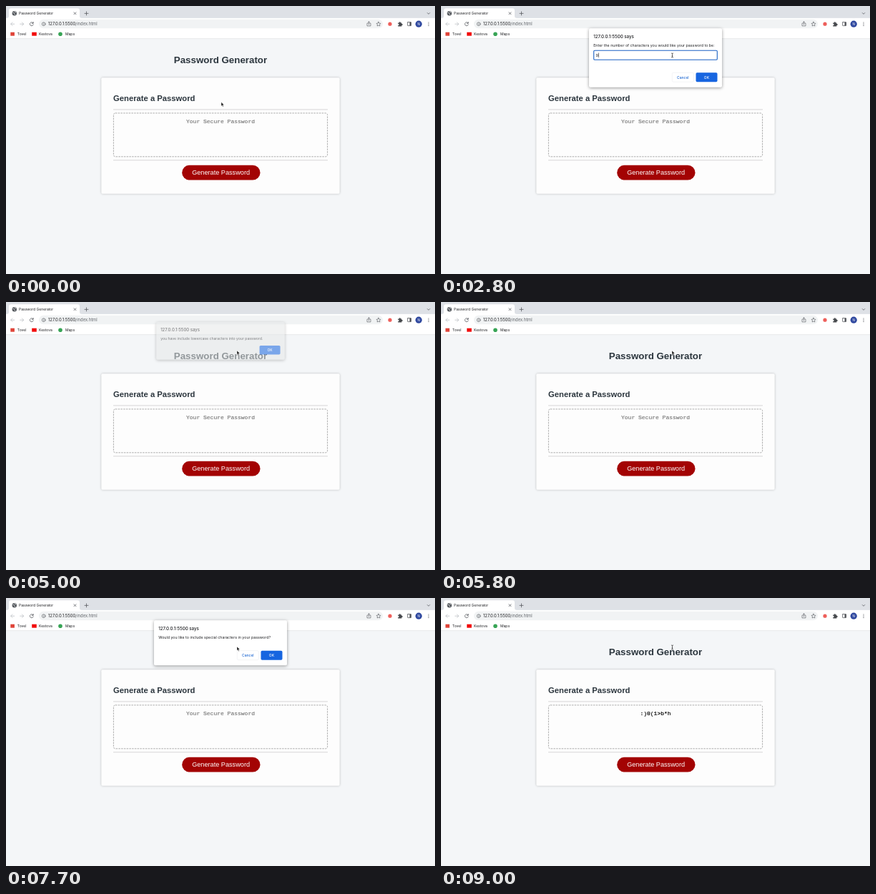
These frames come from a looping animation (600x375 px, 10 s). An HTML page:

```html
<!DOCTYPE html>
<html lang="en">
<head>
<meta charset="utf-8">
<title>Password Generator</title>
<style>
  html, body { margin: 0; width: 100%; height: 100%; overflow: hidden; background: #f4f6f8; }
  svg { display: block; width: 600px; height: 375px; }
  text { white-space: pre; }
  .ui { font-family: Inter, Roboto, sans-serif; fill: #202124; }
  .page { font-family: "Liberation Sans", Arial, sans-serif; fill: #2c363e; font-weight: 700; }
  .mono { font: 8px "Liberation Mono", "Courier New", monospace; text-anchor: middle; }
  .mid { text-anchor: middle; }
  .line { fill: none; stroke: #505358; stroke-width: .75; stroke-linecap: round; stroke-linejoin: round; }
  .card { filter: drop-shadow(0 .9px 1.7px rgba(0, 0, 0, .25)); }
  .sheet { filter: drop-shadow(0 1px 2px rgba(0, 0, 0, .4)); }
</style>
</head>
<body>
<svg viewBox="0 0 600 375">
  <rect width="600" height="375" fill="#f4f6f8"/>

  <!-- Browser frame -->
  <rect width="600" height="17" fill="#dee1e6"/>
  <path d="M1 17Q4 17 4 14V6.500Q4 3.300 7 3.300H100Q103 3.300 103 6.500V14Q103 17 106 17Z" fill="#fff"/>
  <rect y="16.900" width="600" height="29" fill="#fff"/>
  <rect y="45.500" width="600" height=".6" fill="#d9dce0"/>
  <circle cx="11.800" cy="10.300" r="3.200" fill="#55595e"/>
  <path d="M9.600 9.300Q11 9 11.500 10.400T13 12M11.600 7.700Q13 8.400 14.200 8.600" fill="none" stroke="#fff" stroke-width=".8"/>
  <text class="ui" x="18" y="12.200" font-size="5">Password Generator</text>
  <path class="line" d="M95 8.800l3 3M98 8.800l-3 3M110 10.400h5M112.500 7.900v5M589.300 9.600l1.700 1.700 1.700-1.700"/>

  <g class="line">
    <path d="M11.700 25.200H6.800M9 22.900L6.700 25.200 9 27.500M19.700 25.200h4.900M22.400 22.900l2.300 2.300-2.300 2.300" stroke="#b9bcc0"/>
    <path d="M37.700 23.500A2.500 2.500 0 1 0 38.300 25.900M38.200 22.400V24.300H36.300"/>
  </g>
  <rect x="46" y="18.800" width="481" height="12.500" rx="6.250" fill="#f1f3f4"/>
  <g class="line">
    <circle cx="52.700" cy="25.200" r="2.400" stroke-width=".6"/>
    <path d="M52.700 25v1.400M52.700 23.800v.1" stroke-width=".6"/>
    <path d="M506.200 24.200h-1.200v3.700h5v-3.700h-1.200M507.500 26V21.900M506.200 23.100l1.300-1.300 1.300 1.300" stroke-width=".6"/>
    <path d="M521 22.200l.9 1.900 2.100.3-1.500 1.500.4 2.100-1.900-1-1.900 1 .4-2.100-1.500-1.500 2.100-.3Z" stroke-width=".6"/>
    <rect x="561.600" y="22.600" width="5" height="5" rx=".5"/>
  </g>
  <text class="ui" x="59" y="27.300" font-size="5.830">127.0.0.1:5500<tspan fill="#62666b">/index.html</tspan></text>
  <circle cx="537" cy="25.200" r="2.600" fill="#ee5f5b"/>
  <path d="M548.300 23.600h1.600a1 1 0 1 1 1.900 0h1.600v1.500a1 1 0 1 1 0 1.900v1.400h-5.100v-1.400a1 1 0 1 0 0-1.900Z" fill="#46494d"/>
  <rect x="564.500" y="22.600" width="2.100" height="5" fill="#505358"/>
  <circle cx="577.200" cy="25.200" r="4.600" fill="#2f489f"/>
  <text class="ui mid" x="577.200" y="26.900" font-size="4.600" style="fill:#fff">N</text>
  <g fill="#505358"><circle cx="591" cy="23" r=".6"/><circle cx="591" cy="25.200" r=".6"/><circle cx="591" cy="27.400" r=".6"/></g>

  <rect x="6.300" y="36.700" width="5.600" height="5" fill="#df4338"/>
  <rect x="36.200" y="36.700" width="6.600" height="5" fill="#f20d0d"/>
  <circle cx="76" cy="39.200" r="2.800" fill="#37a455"/>
  <g class="ui" font-size="5">
    <text x="15.800" y="41">Tovel</text>
    <text x="46" y="41">Kestova</text>
    <text x="83" y="41">Maps</text>
  </g>

  <!-- Page -->
  <text class="page mid" x="300" y="80" font-size="13.330">Password Generator</text>
  <rect class="card" x="133.300" y="100.300" width="333.400" height="162.400" rx="2" fill="#fdfdfd"/>
  <text class="page" x="150" y="132.700" font-size="11.250">Generate a Password</text>
  <path d="M150 144.900H450M150 215.800H450" stroke="#d0cecf" stroke-width=".85"/>
  <rect x="150.400" y="149.900" width="299.200" height="60.900" rx="2.500" fill="none" stroke="#9c9c9c" stroke-width=".83" stroke-dasharray="2.500 1.250"/>
  <text class="mono" id="field" x="300" y="163.800"></text>
  <rect x="246.200" y="222.700" width="109.300" height="20.900" rx="10.450" fill="#a30303"/>
  <text class="page mid" x="300.600" y="236.400" font-size="9.170" style="fill:#fff;font-weight:400">Generate Password</text>

  <g id="dialog"></g>
  <g id="cursor"></g>
</svg>
<script>
const LOOP = 10000, STEP = 100;
const $ = id => document.getElementById(id);

const ask = what => `Would you like to include ${what} in your password?`;
const told = what => `you have include ${what} characters into your password.`;

// [kind, fully open at, starts closing at, message, height]
const dialogs = [
  ["prompt", 1400, 3000, "Enter the number of characters you would like your password to be:", 82.500],
  ["alert", 3300, 3600, "your password will have 9 characters.", 54.500],
  ["confirm", 4000, 4300, ask("lower case letters"), 63],
  ["alert", 4600, 5000, told("lowercase"), 54.500],
  ["confirm", 5300, 5700, ask("upper case letters"), 63],
  ["alert", 6000, 6400, told("uppercase"), 54.500],
  ["confirm", 6700, 7000, ask("numbers"), 54.500],
  ["alert", 7300, 7600, told("number"), 54.500],
  ["confirm", 7700, 8100, ask("special characters"), 63],
  ["alert", 8400, 8800, told("special"), 54.500]
];

// Pointer waypoints: time, x, y
const path = [[0, 301, 134.500], [600, 300, 196], [900, 302, 249], [1100, 305, 232],
              [1300, 305, 232], [2100, 323, 68]];

const shapes = {
  arrow: '<path d="M0 0V5.600L1.300 4.400 2.200 6.500 3.200 6.100 2.300 4.100H4Z" fill="#111" stroke="#fff" stroke-width=".45"/>',
  beam: '<path d="M-1 -2Q.5 -2 .5 -1.200Q.5 -2 2 -2M.5 -1.200V3.200M-1 4Q.5 4 .5 3.200Q.5 4 2 4M-.3 1.800H1.300" fill="none" stroke="#222" stroke-width=".65"/>',
  hand: '<path d="M-.6 0Q0 -.7 .6 0V2.700L3.300 3.300Q4 3.500 3.800 4.500L3.200 6.800H.2L-2 4.200Q-1.700 3.400 -.6 4.100Z" fill="#fff" stroke="#111" stroke-width=".5"/>'
};

function button(x, y, label, fill, ink, edge) {
  return `<rect x="${x}" y="${y - 6.500}" width="30" height="13" rx="1.700" fill="${fill}" stroke="${edge}" stroke-width=".5"/>
    <text class="ui mid" x="${x + 15}" y="${y + 1.800}" font-size="5" font-weight="500" style="fill:${ink}">${label}</text>`;
}

function inputBox(t) {
  const typed = t >= 2800;
  const caret = typed || t < 1900 || t >= 2400;
  return `<rect x="213.700" y="62.300" width="172.600" height="13" rx="1.300" fill="#fff" stroke="#1c62c4" stroke-width="1.100"/>
    ${typed ? '<text class="ui" x="216.600" y="70.700" font-size="5.400">9</text>' : ""}
    ${caret ? `<rect x="${typed ? 220.200 : 216.700}" y="65.500" width=".6" height="6.500" fill="#202124"/>` : ""}`;
}

function drawDialog(t) {
  const active = dialogs.find(([, open, close]) => t >= open - STEP && t <= close);
  if (!active) return "";
  const [kind, open, close, message, height] = active;
  const fading = t < open || t >= close;
  const y = 31 + height - 13.800;
  const look = fading ? 'opacity=".55" transform="matrix(.966 0 0 .966 10.200 -2.070)"' : "";
  return `<g ${look}>
    <rect class="sheet" x="207" y="31.200" width="186" height="${height}" rx="2" fill="${fading ? "#e6e8e8" : "#fff"}"/>
    <text class="ui" x="213.200" y="44.700" font-size="6.200" font-weight="500">127.0.0.1:5500 says</text>
    <text class="ui" x="213.200" y="56.600" font-size="5.310">${message}</text>
    ${kind === "prompt" ? inputBox(t) : ""}
    ${kind === "alert" ? "" : button(323.300, y, "Cancel", "#fff", "#1b66d1", "#e6e8ec")}
    ${button(356.500, y, "OK", "#1765e0", "#fff", "none")}
  </g>`;
}

function pointerAt(t) {
  const i = path.findIndex(p => p[0] > t);
  if (i < 0) return path[path.length - 1].slice(1);
  const [t0, x0, y0] = path[i - 1], [t1, x1, y1] = path[i];
  const k = (t - t0) / (t1 - t0), e = k * k * (3 - 2 * k);
  return [x0 + (x1 - x0) * e, y0 + (y1 - y0) * e];
}

function pointerShape(t, y) {
  if (t >= 9000) return "beam";
  if (t >= 1300) return t < 3000 && y > 62 && y < 75 ? "beam" : "arrow";
  if (y > 150 && y < 211) return "beam";
  return y > 222 && y < 244 ? "hand" : "arrow";
}

function draw(t) {
  const done = t >= 8900;
  $("field").textContent = done ? ":)0(1>b*h" : "Your Secure Password";
  $("field").style.fill = done ? "#000" : "#6b6b6b";
  $("field").style.stroke = done ? "#000" : "#6b6b6b";
  $("field").style.strokeWidth = done ? .2 : .1;
  $("dialog").innerHTML = drawDialog(t);
  const [x, y] = pointerAt(t);
  $("cursor").setAttribute("transform", `translate(${x} ${y})`);
  $("cursor").innerHTML = shapes[pointerShape(t, y)];
}

const start = performance.now();
let last = -1;
function tick() {
  const t = Math.floor((performance.now() - start) % LOOP / STEP) * STEP;
  if (t !== last) draw(last = t);
  requestAnimationFrame(tick);
}
tick();
</script>
</body>
</html>
```
